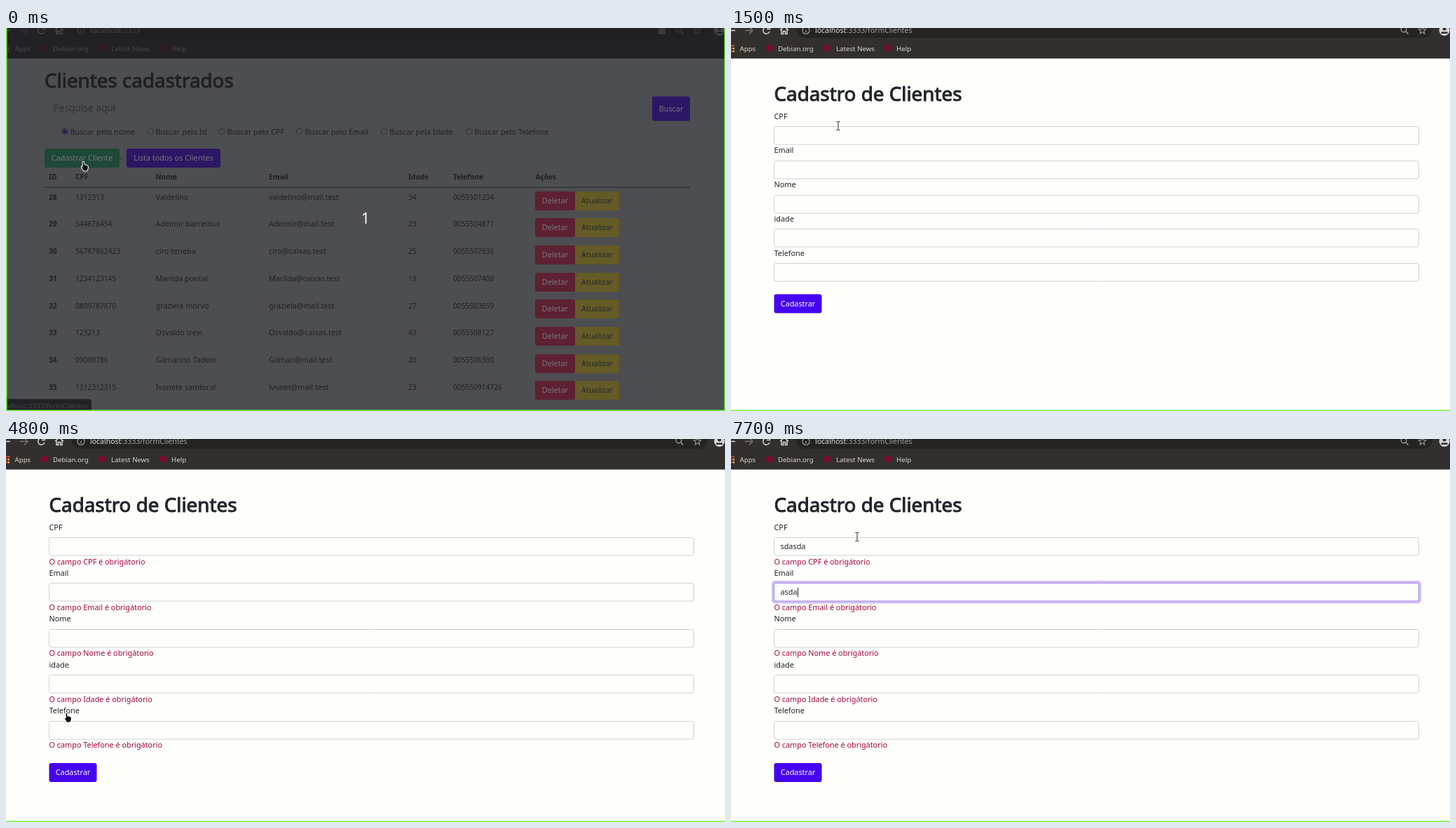
Recreate the animation shown at these times as an HTML page with a canvas. Size 1026 px wide and 546 px high, loop 8 s.

```html
<!DOCTYPE html>
<html lang="pt">
<head>
<meta charset="utf-8">
<title>Cadastro de Clientes</title>
<style>
  html, body { margin: 0; width: 100%; height: 100%; overflow: hidden; background: #fefefb; }
  canvas { display: block; }
</style>
</head>
<body>
<canvas id="stage" width="1026" height="546"></canvas>
<script>
const W = 1026, H = 546, LOOP = 8000;
const ctx = document.getElementById('stage').getContext('2d');

const INK = '#212529', PAGE = '#fefefb', BORDER = '#ced1d8', ERROR = '#a3063f', FRAME = '#72f23a';
const PURPLE = '#4600f0', GREEN = '#08914f', RED = '#cc0128', YELLOW = '#f5dc07';
const DIM = { [PURPLE]: '#2b1764', [GREEN]: '#1e4837', [RED]: '#5e2033', [YELLOW]: '#645b26' };

const CLIENTS = [
  ['28', '1312313', 'Valdelino', 'valdelino@mail.test', '34', '0055501234'],
  ['29', '544676454', 'Adelmir barcelosa', 'Adelmir@mail.test', '23', '0055504871'],
  ['30', '56787862423', 'ciro teneba', 'ciro@caixas.test', '25', '0055502936'],
  ['31', '1234123145', 'Marilda pontal', 'Marilda@caixas.test', '19', '0055507408'],
  ['32', '0809787870', 'graziela morvo', 'graziela@mail.test', '27', '0055503659'],
  ['33', '123213', 'Osvaldo trevi', 'Osvaldo@caixas.test', '43', '0055508127'],
  ['34', '09089786', 'Gilmarino Tadelo', 'Gilmari@mail.test', '20', '0055506390'],
  ['35', '1312312315', 'Ivonete sandoral', 'ivonet@mail.test', '23', '005550914726']
];
const COLUMNS = [61, 99, 213.5, 375, 574, 638, 755.5];
const HEADERS = ['ID', 'CPF', 'Nome', 'Email', 'Idade', 'Telefone', 'Ações'];
const FIELDS = ['CPF', 'Email', 'Nome', 'idade', 'Telefone'];

// Each track holds [time, value...]; a value stays until the next entry.
const CURSOR = [
  [0, 'hand', 108, 190], [1200, 'beam', 117, 187], [1300, 'beam', 131, 168],
  [1400, 'beam', 146, 149], [1500, 'beam', 153, 139.5], [2300, 'beam', 140, 179],
  [2500, 'beam', 130, 215], [2600, 'beam', 112, 280], [2700, 'beam', 98, 340],
  [2800, 'hand', 86, 381], [2900, 'hand', 84, 390], [5300, 'arrow', 145, 246],
  [5500, 'arrow', 161, 205], [5600, 'beam', 177, 158], [5700, 'beam', 180, 139.5]
];
const CPF_FOCUS = [[0, 0], [1800, .5], [1900, 1], [4700, 0], [5900, .4], [6000, .8], [6100, 1], [7100, .5], [7200, 0]];
const EMAIL_FOCUS = [[0, 0], [7100, .5], [7200, 1]];
const CPF_CARET = [[0, 0], [1800, 1], [2300, 0], [3200, 1], [3500, 0], [4200, 1], [4700, 0], [5900, 1], [7100, 0]];
const CPF_TEXT = [[0, ''], [6300, 's'], [6400, 'sda'], [6500, 'sdas'], [6600, 'sdasda']];
const EMAIL_TEXT = [[0, ''], [7500, 'a'], [7600, 'asd'], [7700, 'asda']];

const entryAt = (track, t) => track.filter(e => e[0] <= t).pop();
const valueAt = (track, t) => entryAt(track, t)[1];

function rect(x, y, w, h, color) {
  ctx.fillStyle = color;
  ctx.fillRect(x, y, w, h);
}

function rounded(x, y, w, h, r) {
  ctx.beginPath();
  ctx.roundRect(x, y, w, h, r);
}

function text(str, x, y, size = 10.85, color = INK, weight = 400, align = 'left') {
  ctx.font = `${weight} ${size}px "Noto Sans", "Open Sans", sans-serif`;
  ctx.textAlign = align;
  ctx.fillStyle = color;
  ctx.fillText(str, x, y);
}

// A thin outline turns the regular face into a medium weight.
function heading(str, x, y) {
  text(str, x, y, 27.8);
  ctx.strokeStyle = INK;
  ctx.lineWidth = 1;
  ctx.lineJoin = 'round';
  ctx.strokeText(str, x, y);
  ctx.lineJoin = 'miter';
}

function dot(x, y, r, color) {
  ctx.fillStyle = color;
  ctx.beginPath();
  ctx.arc(x, y, r, 0, 7);
  ctx.fill();
}

function ring(x, y, r, color, width = 1, from = 0, to = 7) {
  ctx.strokeStyle = color;
  ctx.lineWidth = width;
  ctx.beginPath();
  ctx.arc(x, y, r, from, to);
  ctx.stroke();
}

function line(color, width, ...points) {
  ctx.strokeStyle = color;
  ctx.lineWidth = width;
  ctx.beginPath();
  for (const [x, y] of points) ctx.lineTo(x, y);
  ctx.stroke();
}

function button(label, x, y, w, h, fill, color, dim) {
  ctx.fillStyle = dim ? DIM[fill] : fill;
  rounded(x, y, w, h, 3);
  ctx.fill();
  const ink = dim ? (color === INK ? '#26272b' : '#77767f') : color;
  text(label, x + w / 2, y + h / 2 + 3.5, 10.85, ink, 400, 'center');
}

function inputBox(x, y, w, h, focus = 0) {
  if (focus) {
    ctx.fillStyle = `rgba(70,0,240,${.25 * focus})`;
    rounded(x - 3, y - 3, w + 6, h + 6, 5);
    ctx.fill();
  }
  ctx.fillStyle = PAGE;
  rounded(x + .5, y + .5, w - 1, h - 1, 3);
  ctx.fill();
  ctx.strokeStyle = focus ? '#a284f2' : BORDER;
  ctx.lineWidth = 1;
  ctx.stroke();
}

function drawToolbar(url, loading, translate) {
  const icon = '#d8d7d5', grey = '#a09f9d';
  rect(0, 0, W, 43.5, '#32302e');
  ctx.fillStyle = '#252422';
  rounded(93, -14, 908, 28, 13);
  ctx.fill();
  line(icon, 1.5, [-6, 3.5], [6, 3.5]);
  line('#777573', 1.5, [20, 3.5], [30, 3.5]);
  line('#777573', 1.5, [26, -1.5], [31, 3.5], [26, 8.5]);
  if (loading) {
    line(icon, 1.5, [46, -1], [55, 8]);
    line(icon, 1.5, [55, -1], [46, 8]);
  } else {
    ring(50.5, 3.5, 4.7, icon, 1.5, .3, 5.4);
    line(icon, 1.5, [51, 1.5], [55.5, 1.5], [55.5, -3]);
  }
  line(icon, 1.5, [70, 3], [76, -2], [82, 3]);
  line(icon, 1.5, [72, 2], [72, 8.5], [74.5, 8.5], [74.5, 4.5], [77.5, 4.5], [77.5, 8.5], [80, 8.5], [80, 2]);
  ring(107, 3.5, 5, grey, 1.2);
  line(grey, 1.3, [107, 3], [107, 6.5]);
  text('localhost', 120, 7, 10.5, '#dddcda');
  text(url, 120 + ctx.measureText('localhost').width, 7, 10.5, grey);

  if (translate) rect(931, -1, 10, 10, grey);
  ring(960, 2, 3.8, grey, 1.3);
  line(grey, 1.5, [963, 5], [966.5, 8.5]);
  const star = Array.from({ length: 11 }, (_, i) => {
    const a = i * Math.PI / 5 - Math.PI / 2, r = i % 2 ? 2.4 : 5.5;
    return [986.5 + r * Math.cos(a), 3.5 + r * Math.sin(a)];
  });
  line(grey, 1.1, ...star);
  dot(1018, 3.5, 7.5, icon);
  dot(1018, 1, 2.5, '#32302e');
  rect(1013.5, 5.5, 9, 2.5, '#32302e');

  ['#e84a3c', '#f0b429', '#e8b53a'].forEach((c, i) => {
    rect(0, 24 + i * 4, 1.5, 2.5, '#d7493b');
    rect(2.5, 24 + i * 4, 2.5, 2.5, c);
  });
  for (const x of [55, 137, 224]) dot(x, 28.5, 5, '#7d0b30');
  text('Apps', 12.5, 32.5, 9.7, icon);
  text('Debian.org', 67, 32.5, 9.7, icon);
  text('Latest News', 150, 32.5, 9.7, icon);
  text('Help', 236, 32.5, 9.7, icon);
}

function drawStatus() {
  ctx.fillStyle = '#32302e';
  rounded(0, 529, 122, 16, [0, 4, 0, 0]);
  ctx.fill();
  text('alhost:3333/formClientes', 1, 541.5, 9.8, '#c9c8c6');
}

function drawList(dim, loading) {
  drawToolbar(':3333', loading, true);
  heading('Clientes cadastrados', 55, 84.5);
  if (!dim) inputBox(55, 97.5, 864.5, 35);
  text('Pesquise aqui', 67.5, 119, 13.7, '#6c757d');
  [['nome', 84], ['Id', 206], ['CPF', 308], ['Email', 419], ['Idade', 539.5], ['Telefone', 661]].forEach(([key, x], i) => {
    ring(x, 147.5, 4.2, i ? '#767676' : PURPLE);
    if (!i) dot(x, 147.5, 2.6, PURPLE);
    text(`Buscar ${key === 'Idade' ? 'pela' : 'pelo'} ${key}`, x + 7.5, 151.5);
  });
  text('-', 162, 188.5);
  HEADERS.forEach((h, i) => text(h, COLUMNS[i], 216, 10.2, INK, 700));
  rect(55, 226.5, 921, 1, '#343a40');
  CLIENTS.forEach((client, i) => {
    const y = 244.7 + 38.7 * i;
    client.forEach((cell, c) => {
      const wordy = c === 2 || c === 3;
      text(cell, COLUMNS[c], y, wordy ? 10.85 : 10.2, INK, c ? 400 : 700);
    });
    if (!dim) rect(55, Math.round(y + 20.3), 902, 1, '#dcdfe2');
  });
  drawStatus();
  if (dim) rect(0, 0, W, H, 'rgba(30,31,36,.79)');

  button('Buscar', 922, 97.5, 54, 35, PURPLE, '#fff', dim);
  button('Cadastrar Cliente', 55, 172, 107, 27, GREEN, '#fff', dim);
  button('Lista todos os Clientes', 172, 172, 134, 27, PURPLE, '#fff', dim);
  CLIENTS.forEach((_, i) => {
    const y = Math.round(232.5 + 38.7 * i);
    button('Deletar', 755, y, 57, 27, RED, '#fff', dim);
    button('Atualizar', 812, y, 63, 27, YELLOW, INK, dim);
  });
  if (dim) text('1', 513, 279, 21, '#fff', 400, 'center');
  rect(0, 0, 1.5, H, FRAME);
  rect(W - 1, 0, 1, H, FRAME);
}

function drawForm(t) {
  const invalid = t >= 4700;
  const pitch = invalid ? 65.4 : 48.8;
  const loading = t < 900 || (t >= 4600 && t < 4800);
  drawToolbar(':3333/formClientes', loading, false);
  heading('Cadastro de Clientes', 61.5, 104);

  const focus = [valueAt(CPF_FOCUS, t), valueAt(EMAIL_FOCUS, t)];
  const typed = [valueAt(CPF_TEXT, t), valueAt(EMAIL_TEXT, t)];
  const caret = [valueAt(CPF_CARET, t), t >= 7100];
  FIELDS.forEach((name, i) => {
    const y = 140 + pitch * i;
    inputBox(61, Math.round(y), 921, 26.5, focus[i]);
    text(name, 61.5, y - 10.5);
    if (invalid) {
      const label = name[0].toUpperCase() + name.slice(1);
      text(`O campo ${label} é obrigátorio`, 61.5, y + 38.5, 10.85, ERROR);
    }
    if (typed[i]) text(typed[i], 70.5, y + 17);
    if (caret[i]) {
      const x = typed[i] ? 71 + Math.round(ctx.measureText(typed[i]).width) : 71;
      rect(x, Math.round(y + 7), 1, 13, INK);
    }
  });

  let fill = PURPLE;
  if (!invalid && t >= 2800) fill = t < 3200 ? '#3c00d0' : '#3800c2';
  button('Cadastrar', 61.5, invalid ? 462 : 379.5, 68, 27, fill, '#fff');
  if (t < 1200) drawStatus();
}

function outlined(points) {
  ctx.beginPath();
  for (const [x, y] of points) ctx.lineTo(x, y);
  ctx.closePath();
  ctx.lineJoin = 'round';
  ctx.strokeStyle = '#fff';
  ctx.lineWidth = 2;
  ctx.stroke();
  ctx.fillStyle = '#111';
  ctx.fill();
  ctx.lineJoin = 'miter';
}

function drawCursor(kind, x, y) {
  ctx.save();
  ctx.translate(x, y);
  if (kind === 'hand') {
    outlined([[1.5, 1], [3, 1], [3.5, 5], [8, 6.2], [9, 7.5], [8.5, 11], [7.5, 13.5], [3, 13.5], [0, 9], [0, 7.5], [1.8, 8.5]]);
  } else if (kind === 'arrow') {
    outlined([[0, 0], [0, 12], [3, 9.5], [5, 14], [7, 13], [5, 9], [8.5, 8.5]]);
  } else {
    line('#fff', 3, [0, -6.5], [0, 6.5]);
    rect(-.5, -6, 1, 12, '#222');
    for (const side of [-6.5, 5.5]) {
      rect(-2.5, side, 2, 1, '#222');
      rect(.5, side, 2, 1, '#222');
    }
  }
  ctx.restore();
}

function draw() {
  const t = performance.now() % LOOP;
  rect(0, 0, W, H, PAGE);
  if (t < 700) drawList(t < 100, t >= 600);
  else drawForm(t);
  rect(0, H - 1.5, W, 1.5, FRAME);
  const [, kind, x, y] = entryAt(CURSOR, t);
  drawCursor(kind, x, y);
  requestAnimationFrame(draw);
}
draw();
</script>
</body>
</html>
```
